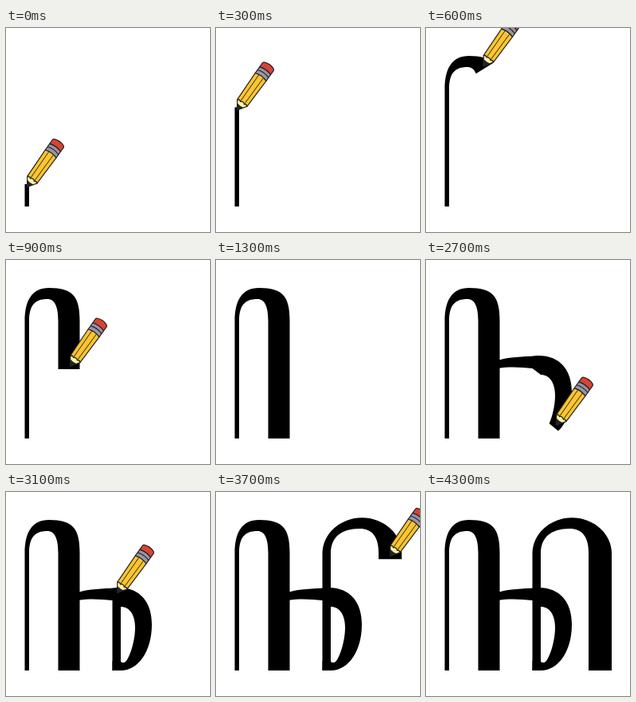
These frames come from a looping animation (256 by 256 pixels, 6300 ms). An HTML page:

```html
<!DOCTYPE html>
<html lang="en">
<head>
<meta charset="utf-8">
<title>Pencil lettering</title>
<style>
  html, body { margin: 0; width: 100%; height: 100%; overflow: hidden; background: #fff; }
  svg { display: block; width: 100vw; height: 100vh; }
  mask path { fill: none; stroke: #fff; stroke-width: 36; }
</style>
</head>
<body>
<svg viewBox="0 0 256 256">
  <defs>
    <mask id="m0" maskUnits="userSpaceOnUse" x="0" y="0" width="256" height="256">
      <path d="M26 224V75C26 52 36 42 54 42C66 42 72 46 75 53S80 70 80 80V224"/>
    </mask>
    <mask id="m1" maskUnits="userSpaceOnUse" x="0" y="0" width="256" height="256">
      <path d="M90 130C108 127 125 128 139 128C161 127 174 141 174 166C174 196 160 219 145 219H132"/>
    </mask>
    <mask id="m2" maskUnits="userSpaceOnUse" x="0" y="0" width="256" height="256">
      <path d="M139 224V77C139 50 154 39 183 39C208 39 218 55 218 77V224"/>
    </mask>
  </defs>

  <path mask="url(#m0)" d="M23.5 224V77C23.5 50 33 35 54 35C84 35 92.5 46 92.5 76V224H65.5V77C65.5 58 61 49 52 49C36 49 29 57 29 77V224Z"/>
  <path mask="url(#m1)" d="M90 126C105 121 120 122 139 120C168 119 183 138 183 166C183 200 166 224 144 224H133.500V212H144C144 214 146 214 148 214C153 214 162 190 162 170C162 154 155 144 144 144L133.500 136C120 135 108 133 90 136Z"/>
  <path mask="url(#m2)" d="M133.500 224V77A49.500 44.500 0 0 1 233 77V224H204V77C204 56 196 46 180 46C157 46 144 57 144 77V224Z"/>

  <g id="pencil" stroke="#25222b" stroke-width="1.2" stroke-linejoin="round">
    <path fill="#fff89c" d="M0 0L-7.500 -11Q0 -15 7.500 -11Z"/>
    <path fill="#25222b" d="M0 0L-4 -6.500Q0 -5.500 4 -6.500Z"/>
    <path fill="#fdc52e" d="M-7.500 -11L-8.500 -51Q0 -54 8.500 -51L7.500 -11Q5.500 -13.500 3 -11Q0 -14 -3 -11Q-5.500 -13.500 -7.500 -11Z"/>
    <path fill="none" stroke-width=".9" d="M-3 -11.500L-3.500 -52M3 -11.500L3.500 -52"/>
    <path fill="#d9432f" d="M-8.500 -60.500V-67Q-8 -68.500 -6.500 -69Q0 -71.500 6.500 -69Q8 -68.500 8.500 -67V-60.500Q0 -63.500 -8.500 -60.500Z"/>
    <path fill="#9896a3" d="M-8.500 -51V-60.500Q0 -63.500 8.500 -60.500V-51Q0 -54 -8.500 -51Z"/>
    <path fill="none" d="M-8.500 -56Q0 -59 8.500 -56"/>
  </g>
</svg>
<script>
const LOOP = 6300, STEP = 100, TIP_LAG = 3.5;
const pencil = document.getElementById('pencil');

// keys: [step, drawn length]; zero or negative lengths count back from the end
const strokes = [
  { start: 0, keys: [[0, 28], [6, 221], [12, 0]] },
  { start: 23, keys: [[0, 28], [5, 0]] },
  { start: 29, keys: [[0, 27], [2, 101], [8, -140], [13, 0]] }
].map((stroke, i) => {
  const guide = document.querySelector(`#m${i} path`);
  const total = guide.getTotalLength();
  const keys = stroke.keys.map(([k, len]) => [k, len > 0 ? len : total + len]);
  return { start: stroke.start, last: keys[keys.length - 1][0], guide, total, keys };
});

function drawnLength({ keys, last, total }, k) {
  if (k < 0) return 0;
  if (k >= last) return total;
  const i = keys.findIndex(key => key[0] > k);
  const [k0, a] = keys[i - 1], [k1, b] = keys[i];
  return a + (b - a) * (k - k0) / (k1 - k0);
}

function render(time) {
  const step = Math.floor((time % LOOP) / STEP);
  let tip = null;
  for (const stroke of strokes) {
    const k = step - stroke.start;
    const len = drawnLength(stroke, k);
    stroke.guide.setAttribute('stroke-dasharray', `${len} 2000`);
    stroke.guide.setAttribute('visibility', len ? 'visible' : 'hidden');
    if (k >= 0 && k <= stroke.last) tip = stroke.guide.getPointAtLength(len - TIP_LAG);
  }
  pencil.setAttribute('visibility', tip ? 'visible' : 'hidden');
  if (tip) pencil.setAttribute('transform', `translate(${tip.x + 0.5} ${tip.y}) rotate(35.5)`);
}

function tick() {
  render(performance.now());
  requestAnimationFrame(tick);
}
tick();
</script>
</body>
</html>
```
